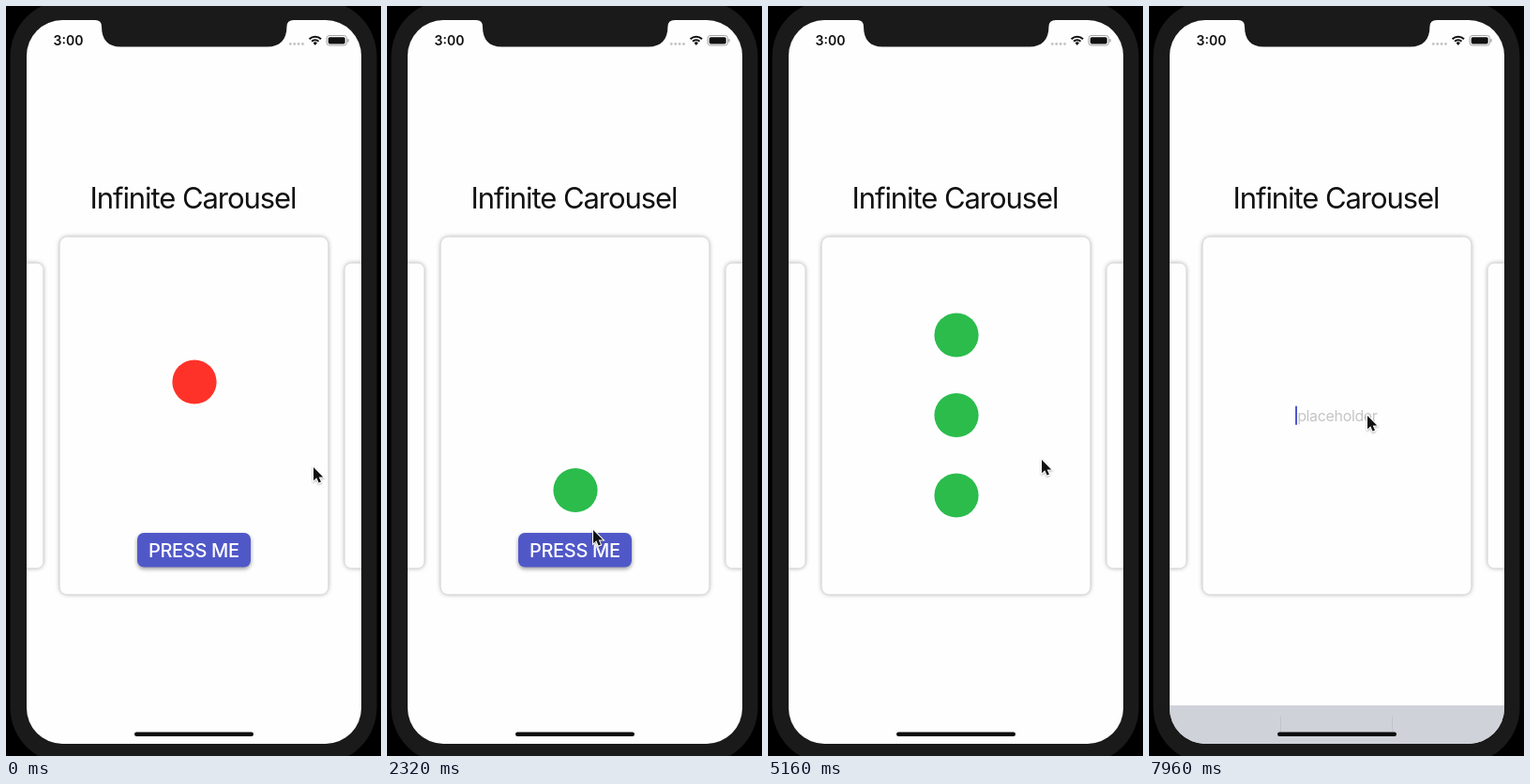
An HTML page with a canvas for the animation above (8 s loop, 400 by 800 pixels).

```html
<!DOCTYPE html>
<html lang="en">
<head>
<meta charset="utf-8">
<title>Infinite Carousel</title>
<style>
  html, body { margin: 0; width: 100%; height: 100%; overflow: hidden; background: #000; }
  canvas { display: block; width: 400px; height: 800px; }
</style>
</head>
<body>
<canvas id="stage"></canvas>
<script>
const LOOP = 8000;
const FONT = 'Inter, Roboto, sans-serif';
const PAPER = '#fefefe', BODY = '#1a1a1a', INDIGO = '#5058c8';
const RED = [255, 50, 41], GREEN = [43, 188, 76];
const SPACING = 283, SHRINK = 0.147, DRAG = 280, SNAP = 68;

const canvas = document.getElementById('stage');
const ratio = window.devicePixelRatio || 1;
canvas.width = 400 * ratio;
canvas.height = 800 * ratio;
const ctx = canvas.getContext('2d');

const clamp = v => Math.min(1, Math.max(0, v));
const lerp = (a, b, k) => a + (b - a) * k;
const smooth = k => k * k * (3 - 2 * k);
const accelerate = k => k * k;
const progress = (t, start, length) => clamp((t - start) / length);

// A swipe follows the pointer for a part of the way, then snaps to the next card.
const swipes = [
  { start: 60, direction: 1, dragged: 0.5 },
  { start: 640, direction: -1, dragged: 0.4 },
  { start: 3540, direction: 1, dragged: 0.5 },
  { start: 5757, direction: 1, dragged: 0.717 }
];

function carouselPosition(t) {
  let position = 0;
  for (const { start, direction, dragged } of swipes) {
    const release = start + DRAG;
    const share = t < release
      ? dragged * accelerate(progress(t, start, DRAG))
      : 1 - (1 - dragged) * Math.exp((release - t) / SNAP);
    position += direction * share;
  }
  return position;
}

// Pointer moves: start, length, target x, target y, easing
const moves = [
  [60, DRAG, 187, 497, accelerate],
  [640, DRAG, 300, 500, accelerate],
  [960, 440, 220, 559, smooth],
  [2600, 760, 266, 497, smooth],
  [3540, DRAG, 125, 493, accelerate],
  [3860, 540, 292, 484, smooth],
  [5757, DRAG, 89, 489, accelerate],
  [6560, 960, 233, 437, smooth]
];

function pointerPosition(t) {
  let x = 328, y = 492;
  for (const [start, length, toX, toY, ease] of moves) {
    const k = ease(progress(t, start, length));
    x = lerp(x, toX, k);
    y = lerp(y, toY, k);
  }
  return [x, y];
}

function box(x, y, w, h, radius, color) {
  ctx.fillStyle = color;
  ctx.beginPath();
  ctx.roundRect(x, y, w, h, radius);
  ctx.fill();
}

function disc(x, y, radius, color) {
  ctx.fillStyle = color;
  ctx.beginPath();
  ctx.arc(x, y, radius, 0, Math.PI * 2);
  ctx.fill();
}

function label(text, x, y, font, color, spacing = 0) {
  ctx.font = `${font} ${FONT}`;
  ctx.letterSpacing = `${spacing}px`;
  ctx.textAlign = 'center';
  ctx.fillStyle = color;
  ctx.fillText(text, x + spacing / 2, y);
}

function withShadow(blur, offset, color, draw) {
  ctx.save();
  ctx.shadowBlur = blur * ratio;
  ctx.shadowOffsetY = offset * ratio;
  ctx.shadowColor = color;
  draw();
  ctx.restore();
}

// Card contents, drawn around the card centre
const contents = [
  (t, change, color) => {
    disc(0.5, lerp(-36, 79.5, change), 23.6, color);
    withShadow(4, 2, 'rgba(0,0,0,.4)', () => box(-60.5, 125, 121, 36.5, 7, INDIGO));
    label('PRESS ME', 0, 150.5, '500 20px', '#fff', -0.3);
  },
  (t, change, color) => [-85.5, 0, 85.5].forEach(y => disc(0.5, y - 0.5, 23.6, color)),
  t => {
    label('placeholder', 0.5, 6, '400 16px', '#c5c5c7', -0.35);
    if (t >= 7640) box(-44.5, -10.5, 2, 20.5, 1, '#4c58cc');
  }
];

function drawCards(t) {
  const position = carouselPosition(t);
  const change = smooth(progress(t, 1620, 600));
  const color = `rgb(${RED.map((v, i) => lerp(v, GREEN[i], change))})`;
  const nearest = Math.round(position);
  for (let i = nearest - 2; i <= nearest + 2; i++) {
    const scale = 1 - SHRINK * Math.min(1, Math.abs(i - position));
    ctx.save();
    ctx.translate(200.5 + (i - position) * SPACING, 437);
    ctx.scale(scale, scale);
    withShadow(5, 0, 'rgba(0,0,0,.38)', () => box(-143, -190.5, 286, 381, 8, PAPER));
    contents[((i % 3) + 3) % 3](t, change, color);
    ctx.restore();
  }
}

function drawKeyboard(t) {
  const rise = 41 * accelerate(progress(t, 7880, 80));
  if (!rise) return;
  const top = 787 - rise;
  box(22, top, 357, rise, 0, '#cfd2d9');
  for (const x of [140, 259]) box(x, top + 12, 1, 16, 0, '#c0c3ca');
}

function drawStatusBar() {
  label('3:00', 66.5, 42, '600 14px', '#111');
  for (let i = 0; i < 4; i++) disc(303.3 + i * 4.4, 40.5, 1.4, '#c4c4c4');

  ctx.strokeStyle = '#111';
  ctx.lineWidth = 2;
  for (const radius of [5.2, 8.8]) {
    ctx.beginPath();
    ctx.arc(329.8, 41.5, radius, -Math.PI * 0.75, -Math.PI * 0.25);
    ctx.stroke();
  }
  ctx.fillStyle = '#111';
  ctx.beginPath();
  ctx.moveTo(329.8, 42);
  ctx.arc(329.8, 41.5, 3, -Math.PI * 0.75, -Math.PI * 0.25);
  ctx.fill();

  ctx.strokeStyle = '#a4a4a4';
  ctx.lineWidth = 1;
  ctx.beginPath();
  ctx.roundRect(342, 31.5, 21.5, 10.5, 3);
  ctx.stroke();
  box(343.7, 33.2, 18, 7.2, 1.6, '#111');
  box(364.3, 35, 1.4, 3.6, 0.7, '#a4a4a4');
}

function drawNotch() {
  ctx.fillStyle = BODY;
  ctx.beginPath();
  ctx.moveTo(95, 14);
  ctx.lineTo(95, 15);
  ctx.quadraticCurveTo(102, 15, 102, 22);
  ctx.bezierCurveTo(102, 36, 109, 43.5, 122, 43.5);
  ctx.lineTo(279, 43.5);
  ctx.bezierCurveTo(292, 43.5, 299.5, 36, 299.5, 22);
  ctx.quadraticCurveTo(299.5, 15, 307, 15);
  ctx.lineTo(307, 14);
  ctx.fill();
}

function drawPointer(t) {
  ctx.save();
  ctx.translate(...pointerPosition(t));
  const arrow = new Path2D('M0 0V14.3L3.3 11.3L5.6 16.6L8 15.6L5.7 10.4H10.3Z');
  withShadow(2, 1, 'rgba(0,0,0,.3)', () => {
    ctx.strokeStyle = '#fff';
    ctx.lineWidth = 2;
    ctx.stroke(arrow);
  });
  ctx.fillStyle = '#111';
  ctx.fill(arrow);
  ctx.restore();
}

function draw(t) {
  ctx.setTransform(ratio, 0, 0, ratio, 0, 0);
  ctx.fillStyle = '#000';
  ctx.fillRect(0, 0, 400, 800);
  box(4.5, -6, 391, 814, 60, BODY);
  box(22, 15, 357, 772, 38, PAPER);

  ctx.save();
  ctx.beginPath();
  ctx.roundRect(22, 15, 357, 772, 38);
  ctx.clip();
  label('Infinite Carousel', 200, 215.5, '400 31px', '#111', -1.08);
  drawCards(t);
  drawKeyboard(t);
  box(137, 774.5, 127, 4.5, 2.2, '#0c0c0c');
  ctx.restore();

  drawNotch();
  drawStatusBar();
  drawPointer(t);
}

const begin = performance.now();
function tick() {
  draw((performance.now() - begin) % LOOP);
  requestAnimationFrame(tick);
}
tick();
</script>
</body>
</html>
```
